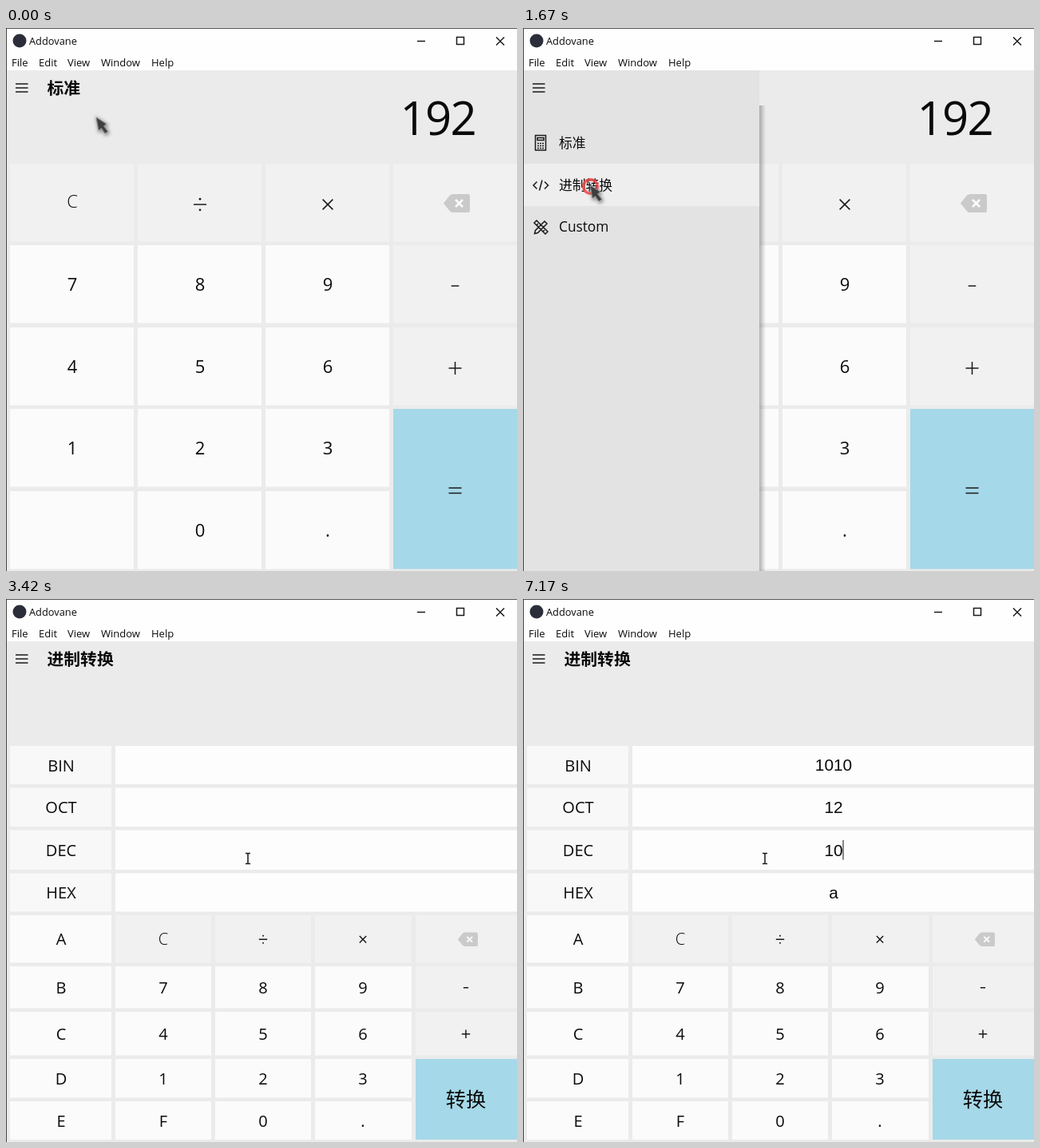
Animation, 640 px wide and 680 px high, one loop 7410 ms. Source, as an HTML page:

```html
<!DOCTYPE html>
<html lang="zh">
<head>
<meta charset="utf-8">
<title>Calculator</title>
<style>
  html, body { margin: 0; width: 100%; height: 100%; overflow: hidden; background: #fdfdfd; }
  svg { display: block; width: 640px; height: 680px; }
  text { font-family: "Open Sans", "Noto Sans", "Noto Sans CJK SC", "Noto Sans CJK", sans-serif; fill: #0a0a0a; }
  .han { font-family: "Noto Sans CJK SC", "Noto Sans CJK", "Noto Sans", sans-serif; }
  .bold { font-weight: 700; }
  .light { font-weight: 300; }
  .value { font-family: "Liberation Sans", Arial, sans-serif; }
  .mid { text-anchor: middle; }
  .icon { fill: none; stroke: #1a1a1a; stroke-width: 1.5; }
</style>
</head>
<body>
<svg viewBox="0 0 640 680" xmlns="http://www.w3.org/2000/svg">
  <defs>
    <linearGradient id="side"><stop offset="0" stop-color="#666" stop-opacity=".5"/><stop offset="1" stop-color="#666" stop-opacity="0"/></linearGradient>
    <linearGradient id="under" x2="0" y2="1"><stop offset="0" stop-color="#707070" stop-opacity=".5"/><stop offset="1" stop-color="#707070" stop-opacity="0"/></linearGradient>
    <filter id="soft" x="-60%" y="-60%" width="220%" height="220%"><feGaussianBlur stdDeviation="2"/></filter>
  </defs>
  <g id="scene"></g>
</svg>
<script>
const LOOP = 7410, TICK = 1000 / 12, TOP = 53;
const OPEN = 782, SWAP = 1689, SLIDE = 250;
const C = { bg: '#ebebeb', op: '#f1f1f1', key: '#fbfbfb', label: '#f8f8f8', field: '#fdfdfd',
            equal: '#a5d8e8', menu: '#e3e3e3', item: '#eeeeee', hover: '#bababa', press: '#d2d2d2', paper: '#fdfdfd' };
const scene = document.getElementById('scene');

const clamp = x => Math.max(0, Math.min(1, x));
const easeOut = p => 1 - (1 - clamp(p)) ** 3;

const rect = (x, y, w, h, fill, more = '') => `<rect x="${x}" y="${y}" width="${w}" height="${h}" fill="${fill}" ${more}/>`;
const path = (d, more = '') => `<path class="icon" d="${d}" ${more}/>`;
const text = (s, x, y, size, cls = '') => `<text x="${x}" y="${y}" font-size="${size}" class="${cls}">${s}</text>`;
// Text centred on a point
const label = (s, x, y, size, cls = '') => text(s, x, y + size * 0.357, size, 'mid ' + cls);

// Operator signs, r = half width
function sign(kind, x, y, r) {
  const line = `M${x - r} ${y}h${2 * r}`;
  const dot = dy => `<circle cx="${x}" cy="${y + dy}" r="${r > 6 ? 1.4 : 1}" fill="#1a1a1a"/>`;
  const k = r * 0.8;
  const w = `stroke-width="${r > 6 ? 1.5 : 1.1}"`;
  switch (kind) {
    case '÷': return path(line, w) + dot(-r * 0.85) + dot(r * 0.85);
    case '×': return path(`M${x - k} ${y - k}l${2 * k} ${2 * k}m0 ${-2 * k}l${-2 * k} ${2 * k}`, w);
    case '+': return path(`${line}M${x} ${y - r}v${2 * r}`, w);
    case '-': return path(`M${x - r * 0.6} ${y}h${1.2 * r}`, w);
    case '=': return path(`M${x - r} ${y - 3}h${2 * r}m0 6.5h${-2 * r}`, w);
  }
}

function backspace(x, y, k) {
  return `<g transform="translate(${x} ${y}) scale(${k})">
    <path d="M-16 0L-8 -10Q-6 -11.5 -4 -11.5H15Q17 -11.5 17 -9V9Q17 11.5 15 11.5H-4Q-6 11.5 -8 10Z" fill="#cacaca"/>
    <path d="M-1 -4.5l9 9m0 -9l-9 9" stroke="#fbfbfb" stroke-width="2.6"/></g>`;
}

function windowBar() {
  const menus = [['File', 7], ['Edit', 41], ['View', 77], ['Window', 119], ['Help', 182]];
  return rect(0, 0, 640, TOP, '#fefefe')
    + '<circle cx="17" cy="16" r="8.5" fill="#2b2e3a"/>'
    + text('Addovane', 29, 21, 12.8)
    + menus.map(([s, x]) => text(s, x, 48, 13)).join('')
    + path('M515 16.5h10M564.5 11.5h9v9h-9zM614 11.5l10 10m0 -10l-10 10', 'stroke-width="1.1"');
}

const burger = () => path('M12 70h15.5M12 75h15.5M12 80h15.5');

function standardPage() {
  const xs = [5, 165, 325, 485], ys = [170, 272, 375, 477, 580];
  const keys = ['C÷×<', '789-', '456+', '123=', ' 0. '];
  let out = rect(0, TOP, 640, 627, C.bg) + text('标准', 51.5, 82.5, 20.8, 'han bold')
    + '<text x="588" y="133.5" font-size="58" letter-spacing="-1.7" text-anchor="end">192</text>';
  keys.forEach((row, r) => [...row].forEach((k, c) => {
    if (r === 4 && c === 3) return;
    const tall = k === '=', x = xs[c], y = ys[r], cx = x + 78, cy = y + 49;
    out += rect(x, y, 155, tall ? 200.5 : 97.5, tall ? C.equal : r === 0 || c === 3 ? C.op : C.key);
    if (k === '<') out += backspace(564, 219.5, 1);
    else if (k === 'C') out += label(k, 83, 217.5, 22, 'light');
    else if ('÷×+-='.includes(k)) out += sign(k, c === 3 ? 562.5 : cx, tall ? 579 : cy + 2, 8);
    else out += label(k, cx, cy + 0.5, 22);
  }));
  return out;
}

function basePage(t, s) {
  const edges = [182, 234.5, 287.5, 341.5, 394, 458, 515, 574, 627, 679.5].map(y => TOP + (y - TOP) * s);
  const names = ['BIN', 'OCT', 'DEC', 'HEX', 'A', 'B', 'C', 'D', 'E'];
  const keys = ['C÷×<', '789-', '456+', '123', 'F0.'];
  const xs = [137, 262, 387, 513], ws = [120, 120, 121, 127], mids = [197, 322, 447, 576];
  const dec = t >= 4825 ? '10' : t >= 4575 ? '1' : '';
  const n = Number(dec), done = t >= 5825;
  const values = [done ? n.toString(2) : '', done ? n.toString(8) : '', dec, done ? n.toString(16) : ''];
  const foot = TOP + 627 * s;
  let out = rect(0, TOP, 640, 627, C.paper);
  if (s < 1) out += rect(0, foot, 640, 16, 'url(#under)');
  out += rect(0, TOP, 640, foot - TOP, C.bg) + text('进制转换', 51.5, 82.5, 20.8, 'han bold');
  names.forEach((name, i) => {
    const y = edges[i] + 2, h = Math.max(0, edges[i + 1] - edges[i] - 4.5), cy = y + h / 2;
    const glow = t < 1850 ? 0 : hoverGlow(t, p => p.x < 136 && p.y >= y && p.y < y + h);
    out += rect(5, y, 127, h, i < 4 ? C.label : C.key);
    if (glow) out += rect(5, y, 127, h, C.press, `opacity="${glow}"`);
    out += label(name, 69, cy + 0.5, 20);
    if (i < 4) {
      out += rect(137, y, 503, h, C.field);
      if (values[i]) out += label(values[i], 389, cy, 20.8, 'value');
      return;
    }
    [...keys[i - 4]].forEach((k, c) => {
      out += rect(xs[c], y, ws[c], h, i === 4 || c === 3 ? C.op : C.key);
      if (k === '<') out += backspace(578, cy + 0.5, 0.76);
      else if ('÷×+-'.includes(k)) out += sign(k, mids[c], cy + 0.5, 5.2);
      else out += label(k, mids[c], cy + 0.5, 20, i === 4 ? 'light' : '');
    });
  });
  const y = edges[7] + 2, h = edges[9] - 2.5 - y;
  out += rect(513, y, 127, h, C.equal) + label('转换', 576, y + h / 2 + 0.5, 25.2, 'han light');
  if (caretOn(t)) out += rect(388.9 + dec.length * 5.8, 302, 1, 24.5, '#101010');
  return out;
}

// Full under the pointer, then fading out after it leaves
const hoverGlow = (t, inside) => Math.max(...[0, 50, 100, 150].map(d => inside(pointer(t - d)) ? 1 - d / 200 : 0));

// Blink of 500 ms, restarted by each edit
function caretOn(t) {
  const start = [5915, 4825, 4575, 1915].find(m => t >= m);
  return start !== undefined && Math.floor((t - start) / 500) % 2 === 0;
}

function sidebar(t, pos) {
  const w = 296 * easeOut((t - OPEN) / SLIDE);
  if (!w) return '';
  const tops = [117, 170, 224];
  const row = tops.findIndex((y, i) => pos.y >= y && pos.y < (tops[i + 1] || 276));
  const overItem = row >= 0 ? rect(0, tops[row], w, 53, C.item) : '';
  return rect(w, 97, 8, 583, 'url(#side)')
    + `<clipPath id="cut"><rect y="${TOP}" width="${w}" height="627"/></clipPath><g clip-path="url(#cut)">`
    + rect(0, TOP, w, 627, C.menu) + overItem
    + path('M15.5 134.5h13v18.5h-13zM18 137.5h8v3h-8z', 'stroke-width=".8"')
    + path('M18 144.5h8M18 147.5h8M18 150.5h8', 'stroke-width="1.2" stroke-dasharray="2 1"')
    + path('M17.5 192.5l-4.5 4.5l4.5 4.5M27 192.5l4.5 4.5l-4.5 4.5M24 190.5l-3.5 13')
    + path('M14 244l3 -3l14 14l-3 3zM17 247l2 -2M25 255l2 -2M14.5 257.5l1 -4L27 242l3 3L18.5 256.5z', 'stroke-width="1.3"')
    + text('标准', 45, 149.5, 16.8, 'han') + text('进制转换', 45, 203, 16.8, 'han')
    + text('Custom', 45, 255, 17.3) + '</g>';
}

// Pointer route: time, x, y; equal neighbours are rests
const route = [[0, 113, 112], [750, 10, 74], [833, 10, 74], [1167, 63, 157], [1500, 84, 197],
  [1750, 84, 197], [2250, 135, 272], [2917, 303, 325], [LOOP, 303, 325]];

// Speed through a stop: zero at rests and ends
function speed(i, axis) {
  const a = route[i - 1], b = route[i], c = route[i + 1];
  if (!a || !c || a[axis] === b[axis] || b[axis] === c[axis]) return 0;
  return (c[axis] - a[axis]) / (c[0] - a[0]);
}

function pointer(t) {
  const i = Math.max(1, route.findIndex(k => k[0] > t));
  const a = route[i - 1], b = route[i], d = b[0] - a[0], p = clamp((t - a[0]) / d), q = 1 - p;
  const at = axis => a[axis] * q * q * (1 + 2 * p) + b[axis] * p * p * (3 - 2 * p)
    + d * p * q * (speed(i - 1, axis) * q - speed(i, axis) * p);
  return { x: at(1), y: at(2) };
}

function cursor(t, { x, y }) {
  if (t > 2300) {
    return path(`M${x - 3} ${y - 6.5}h2.3l.7 .7l.7 -.7h2.3M${x} ${y - 6}v12M${x - 3} ${y + 6.5}h2.3l.7 -.7l.7 .7h2.3`, 'stroke-width="1"');
  }
  const arrow = 'M0 0L12.5 8L9.5 11L14.5 17.5L11 20L6.5 13.5L3 16Z';
  return `<g transform="translate(${x} ${y})">
    <path d="${arrow}" transform="translate(1 1.5)" fill="#555" stroke="#555" stroke-width="3" opacity=".6" filter="url(#soft)"/>
    <path d="${arrow}" fill="#3e3e3e" stroke="#888" stroke-width="1"/></g>`;
}

const ring = (t, from, x, y) => {
  const a = t < from ? 0 : clamp(1 - (t - from - 90) / 240);
  return a ? `<circle cx="${x}" cy="${y}" r="8.8" fill="none" stroke="#f04444" stroke-width="3.6" opacity="${a * 0.85}"/>` : '';
};

function draw(t) {
  const pos = pointer(t);
  const overBurger = pos.x < 42 && pos.y < 96;
  scene.innerHTML = (t >= SWAP ? basePage(t, easeOut((t - SWAP) / SLIDE)) : standardPage() + sidebar(t, pos))
    + (overBurger ? rect(0, TOP, 42.5, 43, C.hover) : '') + burger() + windowBar()
    + rect(0, 0, 640, 1, '#555') + rect(0, 0, 1, 680, '#444')
    + ring(t, 745, 10.5, 74) + ring(t, 1660, 84.5, 198.5) + cursor(t, pos);
}

// The picture advances twelve times a second
const begin = performance.now();
let last = -1;
function frame() {
  const ms = (performance.now() - begin) % LOOP;
  const step = Math.floor((ms + 4) / TICK);
  if (step !== last) {
    last = step;
    draw(Math.min(step * TICK, LOOP - 1));
  }
  requestAnimationFrame(frame);
}
frame();
</script>
</body>
</html>
```
